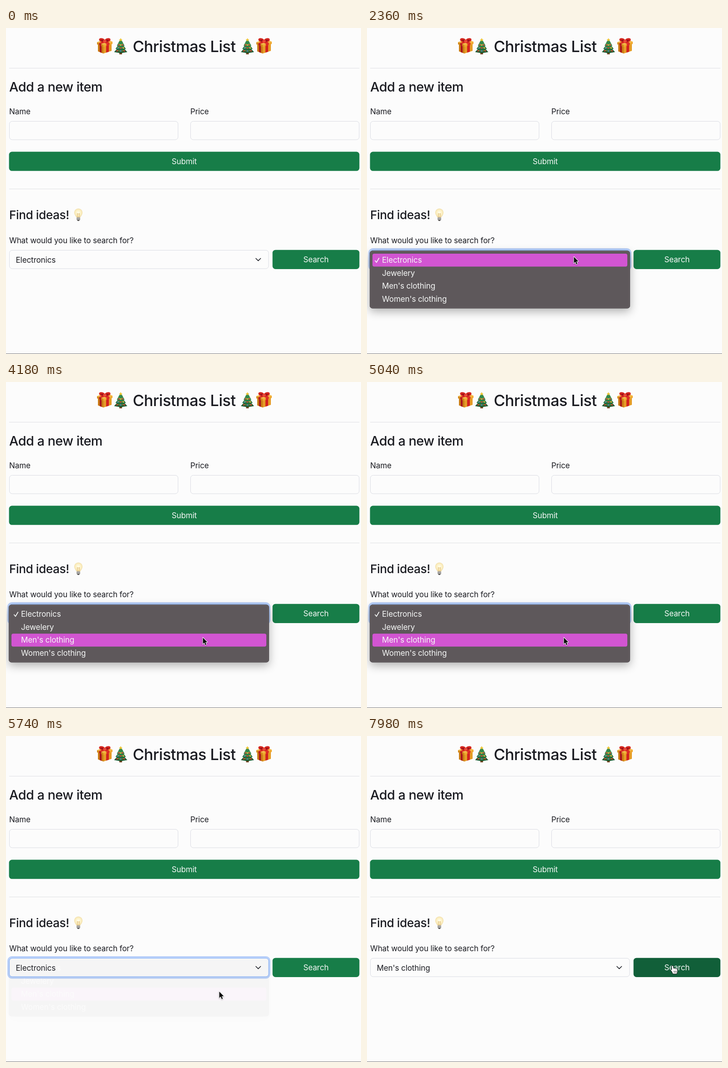
An HTML page with a canvas that plays this animation: 780 px wide and 718 px high, repeating every 8 s.

```html
<!DOCTYPE html>
<html lang="en">
<head>
<meta charset="utf-8">
<title>Christmas List</title>
<style>
html, body { margin: 0; width: 100%; height: 100%; overflow: hidden; background: #fcfcfc; }
canvas { display: block; }
</style>
</head>
<body>
<canvas id="stage" width="780" height="718"></canvas>
<script>
const W = 780, H = 718, LOOP = 8000;
const PAPER = '#fcfcfc', INK = '#1a1b21', LIGHT = '#f6f8f7';
const LEFT = 7, RIGHT = 776.5, CENTER = 391.5;
const GREEN = [23, 125, 72], DARK_GREEN = [17, 95, 57];
const BORDER = [218, 220, 227], FOCUS = [134, 180, 250];
const OPEN = 2000, PICK = 5200, FADE_START = 5365, FADE_END = 5755;
const COMMIT = 5860, HOVER = 6900, CLICK = 7700, QUICK = 150;
const ROW_TOP = 497, ROW_H = 28.6;
const options = ['Electronics', 'Jewelery', "Men's clothing", "Women's clothing"];

// The pointer eases from stop to stop and rests in between.
const moves = [
  { from: 200, to: 1250, x: 454, y: 503 },
  { from: 2550, to: 3120, x: 434, y: 548 },
  { from: 3380, to: 3750, x: 432, y: 562 },
  { from: 5480, to: 5740, x: 468, y: 562 },
  { from: 6050, to: 7300, x: 673, y: 507 }
];

const screen = document.getElementById('stage').getContext('2d');
let ctx = screen;

const clamp = v => Math.max(0, Math.min(1, v));
const ramp = (t, from, length) => clamp((t - from) / length);
const ease = u => u * u * (3 - 2 * u);
const mix = (a, b, u) => a + (b - a) * u;
const blend = (a, b, u) => `rgb(${a.map((v, i) => Math.round(mix(v, b[i], u)))})`;

function layer() {
  const c = document.createElement('canvas');
  c.width = W;
  c.height = H;
  return c;
}

function drawInto(canvas, draw) {
  ctx = canvas.getContext('2d');
  ctx.clearRect(0, 0, W, H);
  draw();
  ctx = screen;
}

function at(x, y, draw) {
  ctx.save();
  ctx.translate(x, y);
  draw();
  ctx.restore();
}

function shadow(blur, drop) {
  ctx.shadowColor = 'rgba(0,0,0,.3)';
  ctx.shadowBlur = blur;
  ctx.shadowOffsetY = drop;
}

function text(str, x, y, { size = 17, weight = 400, color = INK, align = 'left', track = -0.006 } = {}) {
  ctx.font = `${weight} ${size}px Inter, sans-serif`;
  ctx.letterSpacing = size * track + 'px';
  ctx.textAlign = align;
  ctx.fillStyle = color;
  ctx.fillText(str, x, y);
}

const heading = (str, x, y, size, align) =>
  text(str, x, y, { size, align, weight: 500, track: -0.016 });

function rect(color, x, y, w, h) {
  ctx.fillStyle = color;
  ctx.fillRect(x, y, w, h);
}

function box(x, y, w, h, r, fill, stroke, width = 1) {
  ctx.beginPath();
  ctx.roundRect(x, y, w, h, r);
  if (fill) { ctx.fillStyle = fill; ctx.fill(); }
  if (stroke) { ctx.strokeStyle = stroke; ctx.lineWidth = width; ctx.stroke(); }
}

function trace(points) {
  ctx.beginPath();
  points.forEach(([x, y]) => ctx.lineTo(x, y));
}

function poly(color, points) {
  trace(points);
  ctx.fillStyle = color;
  ctx.fill();
}

function line(color, width, points) {
  trace(points);
  ctx.strokeStyle = color;
  ctx.lineWidth = width;
  ctx.lineCap = ctx.lineJoin = 'round';
  ctx.stroke();
}

function oval(color, x, y, rx, ry = rx, turn = 0) {
  ctx.beginPath();
  ctx.ellipse(x, y, rx, ry, turn, 0, 7);
  ctx.fillStyle = color;
  ctx.fill();
}

// One sheared side of the parcel, with a ribbon down its middle third
function side(x, y, slope, w, h, paper, ribbon) {
  ctx.save();
  ctx.transform(1, slope, 0, 1, x, y);
  rect(paper, 0, 0, w, h);
  rect(ribbon, w / 3, 0, w / 3, h);
  ctx.restore();
}

function gift() {
  side(3, 14, 0.4, 12, 16.5, '#c97a16', '#a9131b');
  side(15, 18.8, -0.33, 18, 16.5, '#e59c26', '#d3221f');
  side(1, 10, 0.4, 14, 5, '#d38a1c', '#b8161c');
  side(15, 15.6, -0.33, 20, 5, '#efa930', '#dd2a25');
  ctx.save();
  ctx.transform(14, 5.6, 20, -6.6, 1, 10);
  rect('#f6bb45', 0, 0, 1, 1);
  rect('#d5251f', 1 / 3, 0, 1 / 3, 1);
  rect('#d5251f', 0, 1 / 3, 1, 1 / 3);
  ctx.restore();
  for (const s of [-1, 1]) {
    oval('#d3261f', 18 + 6 * s, 5.8, 6.8, 4.2, -0.3 * s);
    oval('#9b121a', 18 + 5.5 * s, 6.8, 3.4, 1.8, -0.3 * s);
  }
  oval('#ea4a3a', 18, 8.3, 3.6, 3);
}

function tree() {
  const mid = 14.5, greens = ['#1d5b31', '#287341', '#32874c'];
  rect('#74431f', mid - 3, 29, 6, 7);
  greens.forEach((green, i) => {
    const base = 31 - 7 * i, half = 14.5 - 3 * i;
    poly(green, [[mid, base - 16], [mid + half, base], [mid, base + 2.5], [mid - half, base]]);
    line('#dcb34a', 0.9, [[mid - half * 0.6, base - 4], [mid, base - 2], [mid + half * 0.6, base - 4]]);
  });
  const baubles = ['#d93832', '#e0bd35', '#d93832', '#4c91c7'];
  for (let i = 0; i < 9; i++) {
    const row = Math.floor(i / 3);
    oval(baubles[i % 4], mid + (i % 3 - 1) * (4 + 2 * row), 15.5 + 6.5 * row, 1.6);
  }
  const star = Array.from({ length: 10 }, (_, i) => {
    const a = i * Math.PI / 5 - Math.PI / 2, r = i % 2 ? 1.8 : 4.2;
    return [mid + r * Math.cos(a), 4.2 + r * Math.sin(a)];
  });
  poly('#f3c62f', star);
}

function bulb() {
  const mid = 9.5, glow = ctx.createRadialGradient(mid, 9, 1, mid, 9.5, 11);
  glow.addColorStop(0, '#fffbe4');
  glow.addColorStop(0.6, '#fbedbd');
  glow.addColorStop(1, '#e7cf99');
  poly(glow, [[1.8, 14], [17.2, 14], [13.5, 20], [5.5, 20]]);
  oval(glow, mid, 9.3, 9.2);
  line('#d6a95a', 0.8, [[8, 19], [7, 11], [mid, 12.5], [12, 11], [11, 19]]);
  oval('#4c4a49', mid, 26, 2.6, 1.6);
  box(mid - 4, 19.5, 8, 6, 1.5, '#92918f');
  for (const y of [21.2, 23.6]) line('#d0cfcc', 0.8, [[6, y], [13, y - 0.6]]);
}

function button(label, x, y, color) {
  box(x, y, RIGHT - x, 42.2, 6.5, color);
  text(label, (x + RIGHT) / 2, y + 27.6, { color: LIGHT, align: 'center' });
}

function field(label, x) {
  text(label, x, 189.5);
  box(x + 0.5, 205.5, 370.5, 40.5, 6, PAPER, blend(BORDER, FOCUS, 0));
}

function page() {
  rect(PAPER, 0, 0, W, H);
  for (const x of [199, 549]) at(x, 21, gift);
  for (const x of [237.5, 516]) at(x, 22, tree);
  heading('Christmas List', CENTER, 53, 34.3, 'center');
  heading('Add a new item', LEFT, 140, 28.7);
  heading('Find ideas!', LEFT, 421, 26.2);
  at(149.5, 397.5, bulb);
  for (const y of [88, 354]) rect('#dfe0e3', LEFT, y, RIGHT - LEFT, 1);
  field('Name', LEFT);
  field('Price', 405);
  button('Submit', 6.6, 272.6, blend(GREEN, DARK_GREEN, 0));
  text('What would you like to search for?', LEFT, 473.5);
  rect('#77777a', 0, 717, W, 1);
}

function select(t) {
  const focus = ramp(t, OPEN, QUICK) * (1 - ramp(t, CLICK, QUICK));
  ctx.globalAlpha = focus;
  box(3, 485, 578, 49.5, 10, '#b9d0f9');
  ctx.globalAlpha = 1;
  box(7.5, 489.5, 569.5, 40.5, 6, PAPER, blend(BORDER, FOCUS, focus));
  text(options[t < COMMIT ? 0 : 2], 21.5, 516.5);
  line('#25282e', 1.7, [[549, 507.5], [554.2, 512.7], [559.4, 507.5]]);
}

function menu(active) {
  ctx.save();
  shadow(20, 7);
  box(6, 490.5, 572, 127, 6, '#5e585b');
  ctx.restore();
  box(6.5, 491, 571, 126, 5.5, null, '#474246');
  box(7.5, 492, 569, 124, 4.5, null, '#716b6e', 0.8);
  box(12, ROW_TOP + active * ROW_H, 560, 28.6, 4, '#d255d2');
  options.forEach((name, i) => text(name, 33, 517 + i * ROW_H, { color: LIGHT }));
  line(LIGHT, 1.7, [[17.8, 512.5], [20.8, 516.3], [26.3, 507]]);
}

function arrow() {
  const shape = [[0.6, 1], [0.6, 15], [3.8, 12], [6, 17.4], [8.3, 16.4], [6.1, 11.2], [10.4, 11], [0.6, 1]];
  ctx.save();
  shadow(2.5, 1);
  line('#fff', 2, shape);
  ctx.restore();
  poly('#0b0b0c', shape);
}

function hand() {
  const dark = '#17191a';
  const parts = stroke => {
    line(stroke ? dark : '#fff', stroke ? 4 : 2.4, [[-3.8, 8.8], [-0.5, 13]]);
    for (let i = 0; i < 4; i++) {
      const top = i ? 3.8 + i * 0.7 : -0.8;
      box(-3 + i * 2.9, top, 2.9, 13 - top, 1.4, '#fff', stroke, 1.8);
    }
    box(-1.8, 8, 10, 8.5, 2.5, '#fff', stroke, 1.8);
  };
  parts(dark);
  parts(null);
  for (let x = 1.6; x < 7; x += 2.4) line(dark, 0.8, [[x, 10.2], [x, 14]]);
}

function pointer(t) {
  const pos = { x: 785, y: 605 };
  for (const m of moves) {
    const u = ease(ramp(t, m.from, m.to - m.from));
    pos.x = mix(pos.x, m.x, u);
    pos.y = mix(pos.y, m.y, u);
  }
  return pos;
}

const backdrop = layer(), popup = layer();
drawInto(backdrop, page);

function render(t) {
  const { x, y } = pointer(t);
  ctx.drawImage(backdrop, 0, 0);
  select(t);
  button('Search', 585.6, 488.7, blend(GREEN, DARK_GREEN, ramp(t, HOVER, QUICK)));
  if (t >= OPEN && t < FADE_END) {
    const row = t < PICK ? Math.max(0, Math.floor((y - ROW_TOP) / ROW_H)) : 2;
    drawInto(popup, () => menu(row));
    ctx.globalAlpha = 1 - ramp(t, FADE_START, FADE_END - FADE_START);
    ctx.drawImage(popup, 0, 0);
    ctx.globalAlpha = 1;
  }
  at(x, y, t < HOVER ? arrow : hand);
}

const start = performance.now();
function tick() {
  render((performance.now() - start) % LOOP);
  requestAnimationFrame(tick);
}
tick();
</script>
</body>
</html>
```
